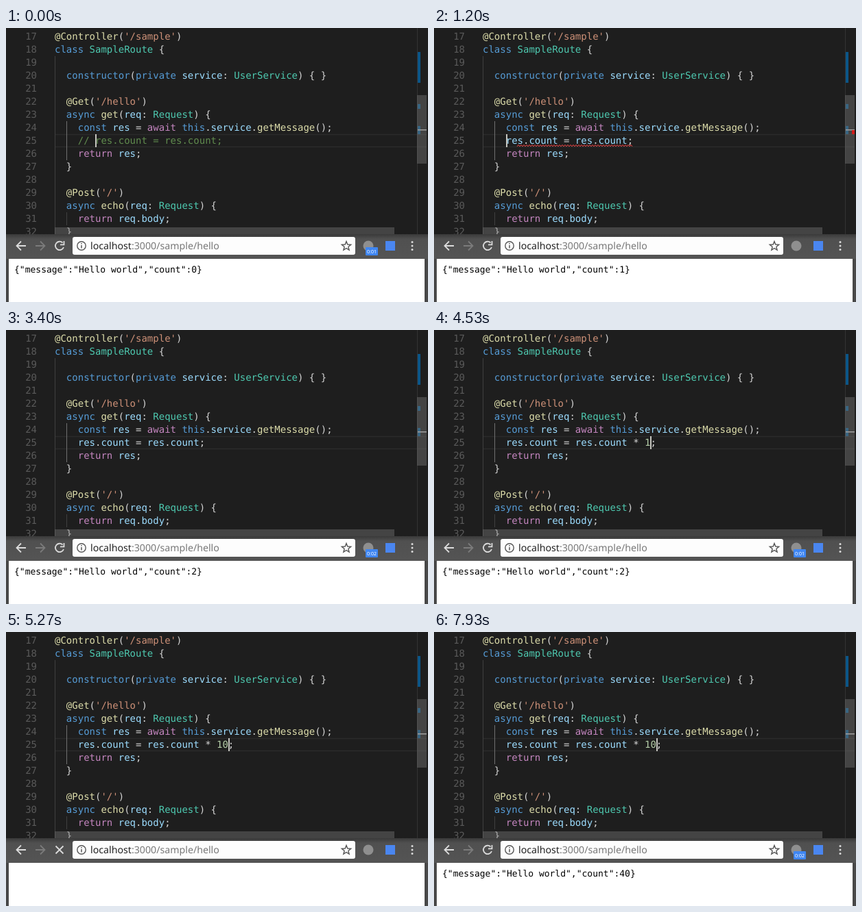
Write an HTML page that moves like this. It is 615 by 400 pixels and loops after 8000 ms.

```html
<!DOCTYPE html>
<html lang="en">
<head>
<meta charset="utf-8">
<title>Live reload</title>
<style>
  html, body { margin: 0; width: 100%; height: 100%; overflow: hidden; background: #1e1e1e; }
  svg { display: block; width: 615px; height: 400px; }
  text { white-space: pre; text-rendering: geometricPrecision; }
  .code { font: 14px "DejaVu Sans Mono", monospace; }
  .body { font: 13px "DejaVu Sans Mono", monospace; }
  .ui { font: 14.2px "Noto Sans", sans-serif; }
  .bold { font-weight: 700; }
  .badge { font: 7px "Noto Sans", sans-serif; }
</style>
</head>
<body>
<svg viewBox="0 0 615 400">
  <defs>
    <linearGradient id="bar" x1="0" y1="0" x2="0" y2="1">
      <stop offset="0" stop-color="#3a3a3a"/>
      <stop offset=".2" stop-color="#505050"/>
      <stop offset="1" stop-color="#545454"/>
    </linearGradient>
    <clipPath id="inner"><rect x="13" y="0" width="587" height="290"/></clipPath>
  </defs>

  <g id="behind">
    <rect width="615" height="301" fill="#101b25"/>
    <rect width="615" height="36" fill="#1f2e3b"/>
    <rect width="615" height="8" fill="#008a00"/>
    <rect x="600" y="8" width="15" height="49" fill="#1c2b38"/>
    <rect x="600" y="57" width="7" height="84" fill="#000"/>
    <rect x="600" y="168" width="15" height="1" fill="#2b4358"/>
    <g class="ui" fill="#e4e4e4">
      <text class="bold" x="600" y="39" fill="#8b98a3">ca</text>
      <text class="bold" x="599" y="214">1 (</text>
      <text x="600" y="234">o</text>
      <text x="600" y="253">ith</text>
    </g>
    <rect x="590" y="260" width="19" height="16" rx="2" fill="#222" stroke="#888"/>
    <text class="ui" x="598" y="273" fill="#ddd" font-size="12">K</text>
    <rect y="289" width="615" height="12" fill="#242424"/>
    <path d="M0 289H42L36 300H0ZM44 289H232L241 300H38Z" fill="#444" stroke="#777"/>
    <path d="M244 289H274L272 295H249Z" fill="#6c6c6c"/>
    <rect x="57" y="282" width="10" height="11" fill="none" stroke="#ccc"/>
    <text class="ui" x="18" y="293" fill="#ddd" style="font-size:12px">g</text>
    <text class="ui" x="75" y="292" fill="#ddd" style="font-size:12px">localhost:3000/sampl</text>
  </g>

  <g id="editor">
    <rect width="615" height="301" fill="#1e1e1e"/>
    <path d="M71 155.5H613M71 173.5H613" stroke="#2b2b2b" stroke-width="1.5"/>
    <path d="M71.5 41V301M88.5 269V288" stroke="#404040"/>
    <path d="M88.5 136V193" stroke="#707070"/>
    <g id="lines" class="code"></g>
    <g id="active" class="code"></g>
    <path id="squiggle" fill="none" stroke="#f04545"/>
    <rect id="caret" y="155" width="2" height="19" fill="#c4c4be"/>
    <rect x="71" y="291" width="495" height="10" fill="#797979" fill-opacity=".42"/>
    <path d="M599.5 0V301" stroke="#333"/>
    <path d="M600 35h4v45h-4zM600 111h4v7h-4zM600 143h4v12h-4z" fill="#0b5688"/>
    <rect x="599" y="98" width="14" height="100" fill="#797979" fill-opacity=".42"/>
    <rect x="600" y="148" width="13" height="1.5" fill="#a0a0a0"/>
    <rect id="marker" x="609" y="149" width="4" height="6" fill="#d01c1c"/>
  </g>
  <path id="edge" d="M600.5 0V290" stroke="#4a4a4a"/>

  <rect y="301" width="615" height="99" fill="#484848"/>
  <rect y="301" width="615" height="36" fill="url(#bar)"/>
  <rect x="4" y="337" width="606" height="63" fill="#fff"/>
  <g fill="none" stroke="#dcdcdc" stroke-width="1.8">
    <path d="M29 318H16M22 311.5L15.5 318L22 324.5"/>
    <path d="M43 318H56M50 311.5L56.5 318L50 324.5" stroke="#7b7b7b"/>
    <path id="reload" d="M82.5 313.5A6.2 6.2 0 1 0 84 320M84.5 311V316.3H79"/>
    <path id="stop" d="M72.5 312.5L83.5 323.5M83.5 312.5L72.5 323.5"/>
  </g>
  <rect x="97" y="305" width="412" height="26" rx="3" fill="#fdfdfd"/>
  <circle cx="110" cy="318" r="6.2" fill="none" stroke="#555" stroke-width="1.4"/>
  <path d="M110 317V321.5M110 314V315.6" stroke="#555" stroke-width="1.5"/>
  <text class="ui" x="123" y="323" fill="#777"><tspan fill="#222">localhost</tspan>:3000/sample/hello</text>
  <path id="star" fill="none" stroke="#555" stroke-width="1.4"/>
  <circle cx="528" cy="318" r="7.5" fill="#8f8f8f"/>
  <rect x="553" y="311" width="14" height="14" fill="#4a86f0"/>
  <g fill="#dcdcdc">
    <circle cx="592" cy="312.5" r="1.5"/><circle cx="592" cy="318" r="1.5"/><circle cx="592" cy="323.5" r="1.5"/>
  </g>
  <g id="badge">
    <rect x="524" y="320" width="18" height="12" rx="1" fill="#3f86f2"/>
    <text id="timer" class="badge" x="526" y="329" fill="#fff"></text>
  </g>
  <text id="page" class="body" x="12" y="357" fill="#000"></text>
</svg>
<script>
const LOOP = 8000, LEFT = 71, CHAR = 8.4287, ROW = 19;
const $ = id => document.getElementById(id);
const xOf = col => LEFT + col * CHAR;
const show = (id, on) => { $(id).style.display = on ? '' : 'none'; };

const rules = [
  [/^\/\/.*/, '#608b4e'],
  [/^\/.*/, '#d16969'],
  [/^'[^']*'/, '#ce9178'],
  [/^(class|constructor|private|async|const|this)\b/, '#569cd6'],
  [/^(await|return)\b/, '#c586c0'],
  [/^(SampleRoute|UserService|Request)\b/, '#4ec9b0'],
  [/^(@\w+|\w+(?=\())/, '#dcdcaa'],
  [/^\d+/, '#b5cea8'],
  [/^[a-z]\w*/i, '#9cdcfe'],
  [/^[^\s\w]/, '#d4d4d4']
];

function codeLine(src, y) {
  let out = '', col = 0;
  while (col < src.length) {
    const rest = src.slice(col);
    const rule = rules.find(r => r[0].test(rest));
    if (!rule) { col++; continue; }
    const word = rest.match(rule[0])[0];
    out += `<text x="${xOf(col)}" y="${y}" fill="${rule[1]}">${word}</text>`;
    col += word.length;
  }
  return out;
}

const source = `@Controller('/sample')
class SampleRoute {

  constructor(private service: UserService) { }

  @Get('/hello')
  async get(req: Request) {
    const res = await this.service.getMessage();

    return res;
  }

  @Post('/')
  async echo(req: Request) {
    return req.body;
  }`.split('\n');

$('lines').innerHTML = source.map((src, i) => {
  const y = 17 + i * ROW;
  return `<text x="45" y="${y}" text-anchor="end" fill="#5a5a5a">${17 + i}</text>` + codeLine(src, y);
}).join('');

let star = '';
for (let i = 0; i < 10; i++) {
  const r = i % 2 ? 3 : 7, a = i * Math.PI / 5;
  star += `${i ? 'L' : 'M'}${496 + r * Math.sin(a)} ${318.5 - r * Math.cos(a)}`;
}
$('star').setAttribute('d', star + 'Z');

let wave = 'M121 173';
for (let x = 123, up = true; x <= 290; x += 2, up = !up) wave += `L${x} ${up ? 170.5 : 173}`;
$('squiggle').setAttribute('d', wave);

const stmt = 'res.count = res.count';
const start = {
  text: '// ' + stmt + ';', col: 3, caret: true, count: 0, timer: '0:01',
  loading: false, blank: false, squiggle: false, marker: false, flash: false
};
const type = tail => ({ text: stmt + tail + ';', col: 21 + tail.length, caret: true });
const reloading = { loading: true, timer: '' };
const loaded = count => ({ loading: false, blank: false, count });

// Each step changes part of the state at its time.
const steps = [
  [470, { caret: false }],
  [800, { text: '//' + stmt + ';', col: 2, caret: true }],
  [1070, { text: '/' + stmt + ';', col: 1 }],
  [1140, { ...reloading, blank: true, squiggle: true, marker: true }],
  [1200, { ...loaded(1), text: stmt + ';', col: 0 }],
  [1270, { timer: '0:02' }],
  [1600, { caret: false, squiggle: false, marker: false }],
  [2130, { caret: true, col: 1 }],
  [2200, { col: 15, timer: '0:01' }],
  [2400, { col: 16 }],
  [2600, { col: 17 }],
  [2800, { col: 18 }],
  [2870, { col: 21 }],
  [3270, { ...reloading, flash: true }],
  [3330, { ...loaded(2), flash: false }],
  [3400, { timer: '0:02', caret: false }],
  [3670, type(' ')],
  [4200, type(' *')],
  [4270, { timer: '0:01' }],
  [4400, type(' * ')],
  [4530, type(' * 1')],
  [4870, { flash: true }],
  [4930, { ...type(' * 10'), flash: false, marker: true }],
  [5270, { ...reloading, blank: true, marker: false }],
  [5330, loaded(3)],
  [5400, { timer: '0:02', caret: false }],
  [5930, { caret: true }],
  [6330, { timer: '0:01' }],
  [6470, { caret: false }],
  [6930, { caret: true }],
  [7330, reloading],
  [7400, loaded(40)],
  [7470, { timer: '0:02', caret: false }],
  [7930, { caret: true }]
];

function stateAt(t) {
  const s = { ...start };
  for (const [at, change] of steps) {
    if (at > t) break;
    Object.assign(s, change);
  }
  return s;
}

let drawn = '';
function draw(t) {
  const s = stateAt(t), key = JSON.stringify(s);
  if (key === drawn) return;
  drawn = key;
  $('active').innerHTML = codeLine('    ' + s.text, 169)
    .replace(/x="([\d.]+)"/g, 'x="$1"');
  $('caret').setAttribute('x', Math.round(xOf(4 + s.col)));
  show('caret', s.caret);
  show('squiggle', s.squiggle);
  show('marker', s.marker);
  show('reload', !s.loading);
  show('stop', s.loading);
  show('badge', s.timer);
  show('behind', s.flash);
  show('edge', s.flash);
  $('editor').setAttribute('clip-path', s.flash ? 'url(#inner)' : 'none');
  $('timer').textContent = s.timer;
  $('page').textContent = s.blank ? '' : `{"message":"Hello world","count":${s.count}}`;
}

const origin = performance.now();
function tick() {
  draw((performance.now() - origin) % LOOP);
  requestAnimationFrame(tick);
}
tick();
</script>
</body>
</html>
```
